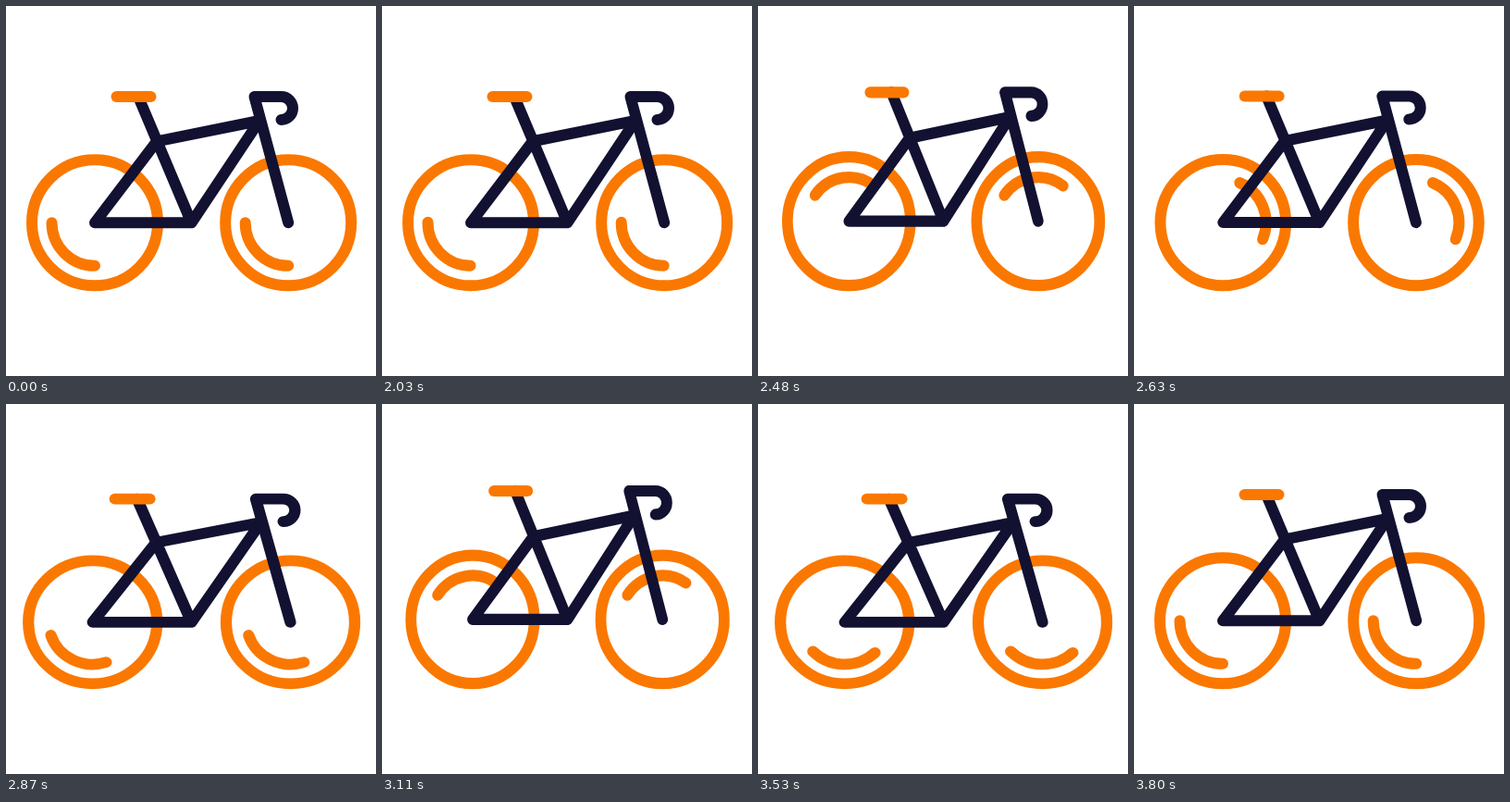
An HTML page that plays this animation: 400 by 400 pixels, repeating every 3.83 s.

```html
<!DOCTYPE html>
<html lang="en">
<head>
<meta charset="utf-8">
<title>Bicycle</title>
<style>
  html, body { margin: 0; width: 100%; height: 100%; overflow: hidden; background: #fff; }
  svg { display: block; width: 100vw; height: 100vh; }
  g { fill: none; stroke-width: 12; stroke-linecap: round; stroke-linejoin: round; }
  .orange { stroke: #fa7800; }
  .navy { stroke: #121131; }
</style>
</head>
<body>
<svg viewBox="0 0 400 400">
  <g id="bike">
    <g class="orange">
      <g transform="translate(96 234.3)">
        <circle r="68"/>
        <path class="shine" d="M-46.5 0A46.5 46.5 0 0 0 0 46.5"/>
      </g>
      <g transform="translate(305.2 234.3)">
        <circle r="68"/>
        <path class="shine" d="M-46.5 0A46.5 46.5 0 0 0 0 46.5"/>
      </g>
    </g>
    <g class="navy">
      <path d="M143 98L200.5 234.3H96L163 146.3L274 124L200.5 234.3"/>
      <path d="M305.2 234.3L268.5 98H297.5a12.5 12.5 0 0 1 0 25"/>
    </g>
    <path class="orange" d="M119.5 98H156.5"/>
  </g>
</svg>
<script>
  const LOOP = 3830, REST = 2000, STEP = 30, STEPS = 60;
  const PIVOT = [200.5, 308.5], STRETCH = 0.023;
  // [step, amount]: 1 is tall and narrow, -1 is low and wide
  const BOUNCE = [[0, 0], [15, 1], [28, -1], [39, 1], [52, -1], [60, 0]];

  const bike = document.getElementById('bike');
  const shines = document.querySelectorAll('.shine');
  const ease = x => x * x * (3 - 2 * x);

  function bounceAt(step) {
    const i = Math.max(1, BOUNCE.findIndex(([s]) => s >= step));
    const [s0, v0] = BOUNCE[i - 1], [s1, v1] = BOUNCE[i];
    return v0 + (v1 - v0) * ease((step - s0) / (s1 - s0));
  }

  function draw(now) {
    const t = now % LOOP;
    const step = Math.min(STEPS, Math.max(0, Math.floor((t - REST) / STEP)));
    const k = bounceAt(step) * STRETCH;
    const [x, y] = PIVOT;
    bike.setAttribute('transform',
      `translate(${x} ${y}) scale(${1 - k} ${1 + k}) translate(${-x} ${-y})`);
    const angle = 720 * ease(step / STEPS);
    shines.forEach(s => s.setAttribute('transform', `rotate(${angle})`));
    requestAnimationFrame(() => draw(performance.now() - start));
  }

  const start = performance.now();
  draw(0);
</script>
</body>
</html>
```
